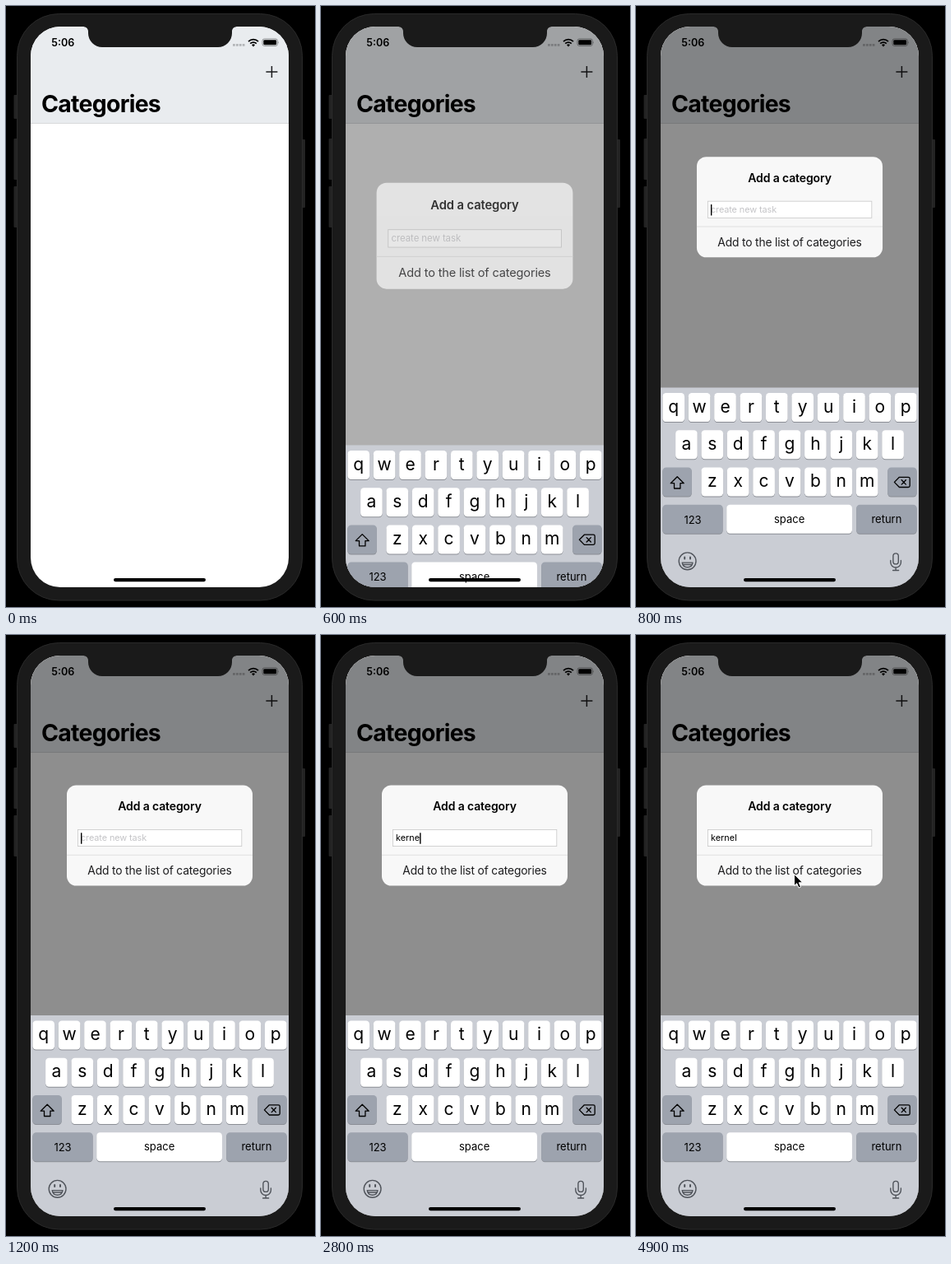
An HTML page that plays this animation: 376x730 px, repeating every 5 s.

```html
<!DOCTYPE html>
<html lang="en">
<head>
<meta charset="utf-8">
<title>Add a category</title>
<style>
  html, body { margin: 0; width: 100%; height: 100%; overflow: hidden; background: #000; }
  svg { display: block; width: 100%; height: 100%; }
  text { font-family: Inter, Roboto, sans-serif; white-space: pre; }
  .mid { text-anchor: middle; }
  .line { fill: none; stroke-linecap: round; stroke-linejoin: round; }
</style>
</head>
<body>
<svg viewBox="0 0 376 730">
  <defs>
    <clipPath id="screen"><rect x="30" y="25" width="314" height="681" rx="36"/></clipPath>
  </defs>
  <rect width="376" height="730"/>

  <g fill="#232323">
    <rect x="9.5" y="108" width="6" height="29" rx="1"/>
    <rect x="9.5" y="161" width="6" height="50" rx="1"/>
    <rect x="9.5" y="219" width="6" height="50" rx="1"/>
    <rect x="358" y="162" width="6" height="83" rx="1"/>
  </g>
  <rect x="13.5" y="9.5" width="347" height="712.5" rx="51" fill="#1a1a1a" stroke="#2a2a2a"/>

  <g clip-path="url(#screen)">
    <rect x="30" y="25" width="314" height="681" fill="#fff"/>
    <rect x="30" y="25" width="314" height="117" fill="#e9ecef"/>
    <rect x="30" y="142" width="314" height="0.8" fill="#cdd0d3"/>
    <text x="55.2" y="48.8" font-size="12.6" font-weight="600">5:06</text>
    <g fill="#b3b5b8">
      <rect x="276" y="46" width="2.8" height="2.8" rx=".6"/>
      <rect x="279.9" y="46" width="2.8" height="2.8" rx=".6"/>
      <rect x="283.8" y="46" width="2.8" height="2.8" rx=".6"/>
      <rect x="287.7" y="46" width="2.8" height="2.8" rx=".6"/>
    </g>
    <g fill="none" stroke="#000" stroke-width="1.8">
      <path d="M295 43.2a8.5 8.5 0 0 1 12 0M297.2 45.6a5.4 5.4 0 0 1 7.6 0"/>
      <path d="M301 49.4l-2-2.1a2.9 2.9 0 0 1 4 0z" fill="#000" stroke="none"/>
    </g>
    <rect x="312" y="39.9" width="18.4" height="8.6" rx="2.4" fill="none" stroke="#7d7f82" stroke-width=".8"/>
    <rect x="313.3" y="41.2" width="15.8" height="6" rx="1.3"/>
    <path d="M331.3 42.7q1.3 1.5 0 3z" fill="#7d7f82"/>
    <path d="M316.4 80h14M323.4 73v14" stroke="#1c1c1e" stroke-width="1.5"/>
    <text x="43" y="129" font-size="28.4" font-weight="700" letter-spacing="-.7">Categories</text>

    <rect id="dim" x="30" y="25" width="314" height="681" opacity="0"/>

    <g id="alert" opacity="0">
      <rect x="74" y="182.5" width="226" height="122" rx="11.5" fill="#f8f8f8"/>
      <text class="mid" x="187" y="213" font-size="14" font-weight="600" letter-spacing="-.12">Add a category</text>
      <rect x="87.4" y="236.4" width="199.4" height="20.2" fill="#fff" stroke="#c8c8c8" stroke-width=".8"/>
      <text id="hint" x="91" y="250.4" font-size="10.9" fill="#c4c4c7" letter-spacing="-.1">create new task</text>
      <text id="typed" x="91" y="250.4" font-size="10.9"></text>
      <rect id="caret" y="240.3" width="1.4" height="13.4"/>
      <rect x="74" y="266.8" width="226" height=".8" fill="#dadada"/>
      <text class="mid" x="187" y="291" font-size="13.8" fill="#1c1c1e" letter-spacing="-.16">Add to the list of categories</text>
    </g>

    <g id="keyboard">
      <rect x="30" y="462" width="314" height="246" fill="#cacdd4"/>
      <g id="keys"></g>
      <path class="line" d="M50.2 570.2l8 8h-4.3v6.3h-7.4v-6.3h-4.3z" stroke="#000" stroke-width="1.3"/>
      <path class="line" d="M320.4 570.8h11q1.8 0 1.8 1.8v8.6q0 1.8-1.8 1.8h-11l-6-6.1zM323.2 574.2l5.2 5.4M328.4 574.2l-5.2 5.4" stroke="#000" stroke-width="1.3"/>
      <g class="line" stroke="#50545b" stroke-width="1.4">
        <circle cx="62.6" cy="672.8" r="10.4"/>
        <path d="M56.2 674.6h12.8q-.8 5.6-6.4 5.6t-6.4-5.6zM57.4 677h10.4"/>
        <path d="M59.2 668v2M66 668v2" stroke-width="2"/>
        <rect x="312.9" y="663.4" width="6.4" height="13" rx="3.2"/>
        <path d="M309.8 672v2.2a6.3 6.3 0 0 0 12.6 0V672M316.1 680.6v3.4M312.6 684h7"/>
      </g>
    </g>
    <rect x="131" y="695" width="112" height="4.2" rx="2.1"/>
  </g>

  <path d="M93 24H282v1c-4 0-7 2-7 6v2a17 17 0 0 1-17 17H117a17 17 0 0 1-17-17v-2c0-4-3-6-7-6z" fill="#1a1a1a"/>
  <path id="pointer" d="M0 0v14.2l3.2-3 2.3 5.4 2.5-1.1-2.3-5.2h4.4z" stroke="#fff" stroke-width="1" stroke-linejoin="round"/>
</svg>

<script>
  const LOOP = 5000, STEP = 100;
  const WORD = 'kernel';
  const KEY_TIMES = [2200, 2300, 2400, 2500, 2800, 3000];
  const $ = id => document.getElementById(id);
  const set = (id, attrs) => {
    for (const name in attrs) $(id).setAttribute(name, attrs[name]);
  };
  const ramp = (t, a, b) => Math.min(1, Math.max(0, (t - a) / (b - a)));
  const mix = (a, b, k) => a + (b - a) * k;
  const smooth = k => k * k * (3 - 2 * k);

  function key(x, y, w, label, size, rise, fill = '#fff') {
    return `<rect x="${x}" y="${y + 1}" width="${w}" height="35" rx="4.2" fill="#8b8e95"/>` +
      `<rect x="${x}" y="${y}" width="${w}" height="35" rx="4.2" fill="${fill}"/>` +
      `<text class="mid" x="${x + w / 2}" y="${y + rise}" font-size="${size}">${label}</text>`;
  }

  function buildKeys() {
    const gray = '#9da3ae';
    const rows = [['qwertyuiop', 32.4], ['asdfghjkl', 48.1], ['zxcvbnm', 79.5]];
    let out = '';
    rows.forEach(([letters, left], r) => {
      [...letters].forEach((c, i) => {
        out += key(left + i * 31.4, 468.6 + r * 45.2, 26.6, c, 21, 23.6);
      });
    });
    out += key(32.4, 559, 35.4, '', 13, 22, gray) + key(306.2, 559, 35.4, '', 13, 22, gray);
    out += key(32.4, 604.2, 73.2, '123', 13, 22.8, gray);
    out += key(110.2, 604.2, 152.8, 'space', 13, 22.2);
    out += key(268.2, 604.2, 73.4, 'return', 13, 22.2, gray);
    $('keys').innerHTML = out;
  }

  // Pointer: a curve in from the right edge, then a slow climb to the button.
  function pointerAt(t) {
    const k = ramp(t, 4300, 4600), u = 1 - k;
    const up = smooth(ramp(t, 4650, 4900));
    return [
      u * u * 352 + 2 * u * k * 290 + k * k * 192.5,
      mix(u * u * 104 + 2 * u * k * 280 + k * k * 325, 290.5, up)
    ];
  }

  function draw(t) {
    const left = Math.pow(1 - ramp(t, 395, 815), 1.85);
    const shown = t < 400 ? 0 : 1 - left;
    const drop = 243 * left + 1 - ramp(t, 900, 1200);
    set('dim', { opacity: 0.443 * shown });
    set('keyboard', {
      transform: `translate(0 ${drop})`,
      visibility: shown ? 'visible' : 'hidden'
    });
    set('alert', {
      opacity: shown,
      transform: `translate(187 ${243.3 + drop / 2}) scale(${1 + 0.196 * left}) translate(-187 -243.3)`
    });

    const count = KEY_TIMES.filter(k => t >= k).length;
    $('typed').textContent = WORD.slice(0, count);
    set('hint', { visibility: count ? 'hidden' : 'inherit' });
    const caret = ramp(t, 700, 800) - ramp(t, 1300, 1600) + ramp(t, 1900, 2100)
      - ramp(t, 3300, 3700) + ramp(t, 4000, 4300) - ramp(t, 4600, 4900);
    set('caret', {
      x: 91 + (count ? $('typed').getComputedTextLength() : 0),
      opacity: caret
    });

    set('pointer', {
      transform: `translate(${pointerAt(t)})`,
      visibility: t >= 4300 ? 'visible' : 'hidden'
    });
  }

  buildKeys();
  const start = performance.now();
  function tick() {
    const t = (performance.now() - start) % LOOP;
    draw(Math.floor(t / STEP) * STEP);
    requestAnimationFrame(tick);
  }
  tick();
</script>
</body>
</html>
```
